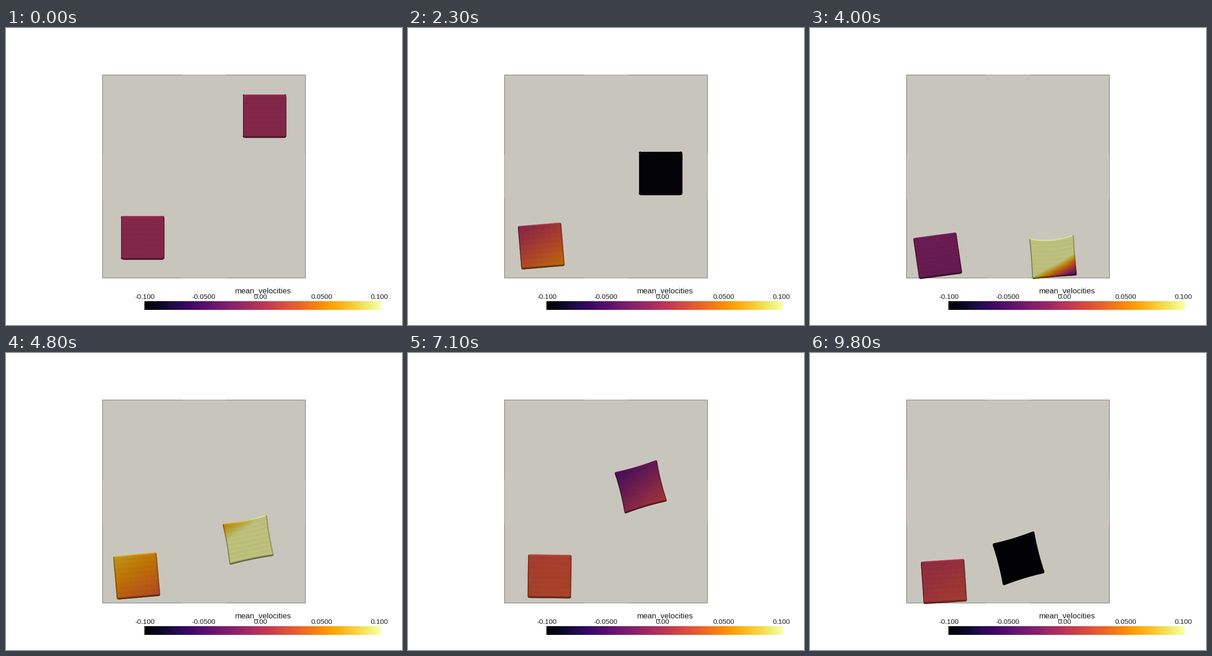
Animation of 864 by 648 pixels, one loop 9900 ms. Source, as a matplotlib script:

```python
import numpy as np
import matplotlib.pyplot as plt
from matplotlib.animation import FuncAnimation
from matplotlib.collections import PolyCollection
from matplotlib.patches import Rectangle

W, H, DPI = 864, 648, 100
PX = 72 / DPI                   # one pixel in points
FRAMES, INTERVAL = 99, 100
GRAVITY = np.array([-0.0425, 0.4324])   # px per frame squared
SPEED = 0.0267                  # colour units per px per frame
FLOOR = 547.3
SIDE = 94.5
N = 47                          # cells along one side of a block
INFERNO = plt.get_cmap("inferno")

fig = plt.figure(figsize=(W / DPI, H / DPI), dpi=DPI, facecolor="white")
ax = fig.add_axes([0, 0, 1, 1])
ax.axis("off")


def rounded_grid(radius=0.075):
    """Grid over -0.5..0.5 whose outer corners are rounded."""
    c = np.linspace(-1, 1, N + 1)
    x, y = np.meshgrid(c, c)
    a = np.maximum(np.abs(x) - 1 + radius, 0)
    b = np.maximum(np.abs(y) - 1 + radius, 0)
    scale = np.maximum(a, b) / np.maximum(np.hypot(a, b), 1e-9)

    def bend(p, d):
        return np.sign(p) * (np.minimum(np.abs(p), 1 - radius) + d * scale) / 2

    return bend(x, a), bend(y, b)


def face_shade():
    rows = np.arange(N)[:, None]
    shade = 0.75 * (1 + 0.015 * np.sin(2 * np.pi * rows / 5.2)) * np.ones((N, N))
    shade[0] = 0.93
    shade[:, 0] = 0.5
    shade[:, -1] = 0.6
    shade[-2] = 0.6
    shade[-1] = 0.38
    return shade


U, V = rounded_grid()
UC, VC = np.meshgrid(*[(np.arange(N) + 0.5) / N - 0.5] * 2)
SHADE = face_shade()


class Flight:
    """Ballistic path from a launch point to a landing point."""

    def __init__(self, start, launch, end, landing):
        self.start, self.end = start, end
        self.pos = np.array(launch)
        span = end - start
        self.vel = (np.array(landing) - self.pos) / span - GRAVITY * span / 2

    def state(self, t):
        d = t - self.start
        return self.pos + self.vel * d + GRAVITY * d * d / 2, self.vel + GRAVITY * d


def contact(t, before, after):
    """Smooth rebound joining the landing of one flight to the next launch."""
    p0, v0 = before.state(before.end)
    p1, v1 = after.state(after.start)
    span = after.start - before.end
    s = (t - before.end) / span
    pos = ((1 + 2 * s) * (1 - s) ** 2 * p0 + s * s * (3 - 2 * s) * p1
           + span * (s * (1 - s) ** 2 * v0 + s * s * (s - 1) * v1))
    vel = (6 * s * (1 - s) * (p1 - p0) / span
           + (1 - s) * (1 - 3 * s) * v0 + s * (3 * s - 2) * v1)
    return pos, vel


class Block:
    """Bouncing block; angle and ripple depend on the time since first impact."""

    def __init__(self, flights, angle, ripple, softness):
        self.flights = flights
        self.hit = flights[0].end
        self.angle, self.ripple, self.softness = angle, ripple, softness
        self.mesh = PolyCollection([], edgecolors="face", linewidths=0.6 * PX, zorder=5)
        ax.add_collection(self.mesh, autolim=False)

    def state(self, t):
        before = None
        for flight in self.flights:
            if t < flight.start:
                return contact(t, before, flight)
            if t <= flight.end:
                return flight.state(t)
            before = flight
        return before.state(t)

    def outline(self, center, s):
        grown = 1 - np.exp(-s / 8)
        stretch = 0.1 * self.softness * grown * np.exp(-s / 20)
        lean = 1.3 * self.softness * grown
        pinch = 2 * self.softness * grown
        dent = 6 * self.softness * s * np.exp(-s / 3)

        a, b = np.radians([self.angle(s) + lean, self.angle(s) - lean])
        arch_u, arch_v = 1 - 4 * U * U, 1 - 4 * V * V
        x = SIDE * (1 + stretch) * U - 2 * pinch * U * arch_v
        y = SIDE * (1 - stretch) * V - 2 * pinch * V * arch_u
        y = y + dent * arch_u * (0.5 - V)
        px = center[0] + x * np.cos(a) + y * np.sin(b)
        py = center[1] - x * np.sin(a) + y * np.cos(b)

        # flatten against the floor
        high, low = py.min(), py.max()
        py = high + (py - high) * min(1, (FLOOR - high) / (low - high))
        return np.stack([px, py], axis=-1)

    def draw(self, t):
        center, (vx, vy) = self.state(t)
        s = max(t - self.hit, 0)
        p = self.outline(center, s)
        quads = np.stack([p[:-1, :-1], p[:-1, 1:], p[1:, 1:], p[1:, :-1]], axis=2)
        value = SPEED * (vx - vy) / 2
        if s > 0:
            value = value + self.ripple(s) * (VC + 0.5 * UC)
        value = value * np.ones((N, N))
        rgb = INFERNO(np.clip(value * 5 + 0.5, 0, 1))[..., :3] * SHADE[..., None]
        self.mesh.set_verts(quads.reshape(-1, 4, 2))
        self.mesh.set_facecolor(rgb.reshape(-1, 3))


def draw_stage():
    half = 221.5
    x0, x1 = W / 2 - half, W / 2 + half
    y0, y1 = H / 2 - half, H / 2 + half
    ax.add_patch(Rectangle((x0, y0), x1 - x0, y1 - y0, fc="#c8c5bd",
                           ec="#8c9090", lw=PX, zorder=1, snap=False))
    edge = dict(color="#7e8383", lw=1.3 * PX, zorder=2,
                solid_capstyle="butt", snap=False)
    for y in (y0, y1):
        ax.plot([x0, 384], [y, y], **edge)
        ax.plot([480, x1], [y, y], **edge)
    for x in (x0, x1):
        ax.plot([x, x], [y0, 276], **edge)
        ax.plot([x, x], [372, y1], **edge)


def draw_colorbar():
    ax.imshow(np.linspace(0, 1, 256)[None], cmap=INFERNO, aspect="auto",
              extent=(302, 817.5, 615, 596), interpolation="nearest", zorder=3)
    font = dict(family="Liberation Sans", color="#1c1c1c", ha="center",
                va="baseline", zorder=6)
    ax.text(561, 579, "mean_velocities", size=17 * PX, **font)
    ticks = [(302.5, "-0.100"), (431.5, "-0.0500"), (555.5, "0.00"),
             (689, "0.0500"), (814, "0.100")]
    for x, label in ticks:
        ax.text(x, 591, label, size=15.2 * PX, **font)


def rocking(s):
    """Degrees: the low block tips over, rocks back and settles."""
    return np.interp(s, [0, 10.3, 24, 27.3, 35.3, 49.3, 68.3, 85.3],
                     [0, 4.8, 9, 8, 5, 2.9, -4.8, 3.8])


def settling(s):
    """Degrees: the high block turns once and keeps its tilt."""
    return 15.7 * (1 - np.exp(-s / 10))


def slow_ripple(s):
    return 0.04 * np.cos(2 * np.pi * (s - 11) / 62)


def fast_ripple(s):
    return -(0.09 + 0.6 * np.exp(-s / 3)) * np.cos(2 * np.pi * (s - 3.4) / 18.6)


draw_stage()
draw_colorbar()
ax.set_xlim(0, W)
ax.set_ylim(H, 0)

low_block = Block(
    [Flight(0, (298, 457.5), 12.66, (293.6, 498)),
     Flight(16.4, (292.5, 498), 37.2, (280.8, 491.7)),
     Flight(45.4, (281.1, 494), 62, (302.5, 497.8)),
     Flight(66, (305.7, 498), 81, (312.2, 498.6)),
     Flight(85, (308.2, 498), 95.5, (293.3, 497.7)),
     Flight(99.5, (292, 498), 107.8, (285.5, 498))],
    rocking, slow_ripple, softness=0)

high_block = Block(
    [Flight(0, (564, 192), 36.57, (532.8, 497.9)),
     Flight(40.3, (530.3, 497.5), 98, (455, 448))],
    settling, fast_ripple, softness=1)


def draw(i):
    low_block.draw(i)
    high_block.draw(i)
    return low_block.mesh, high_block.mesh


anim = FuncAnimation(fig, draw, frames=FRAMES, interval=INTERVAL,
                     repeat=True, repeat_delay=0, blit=False)
plt.show()
```
